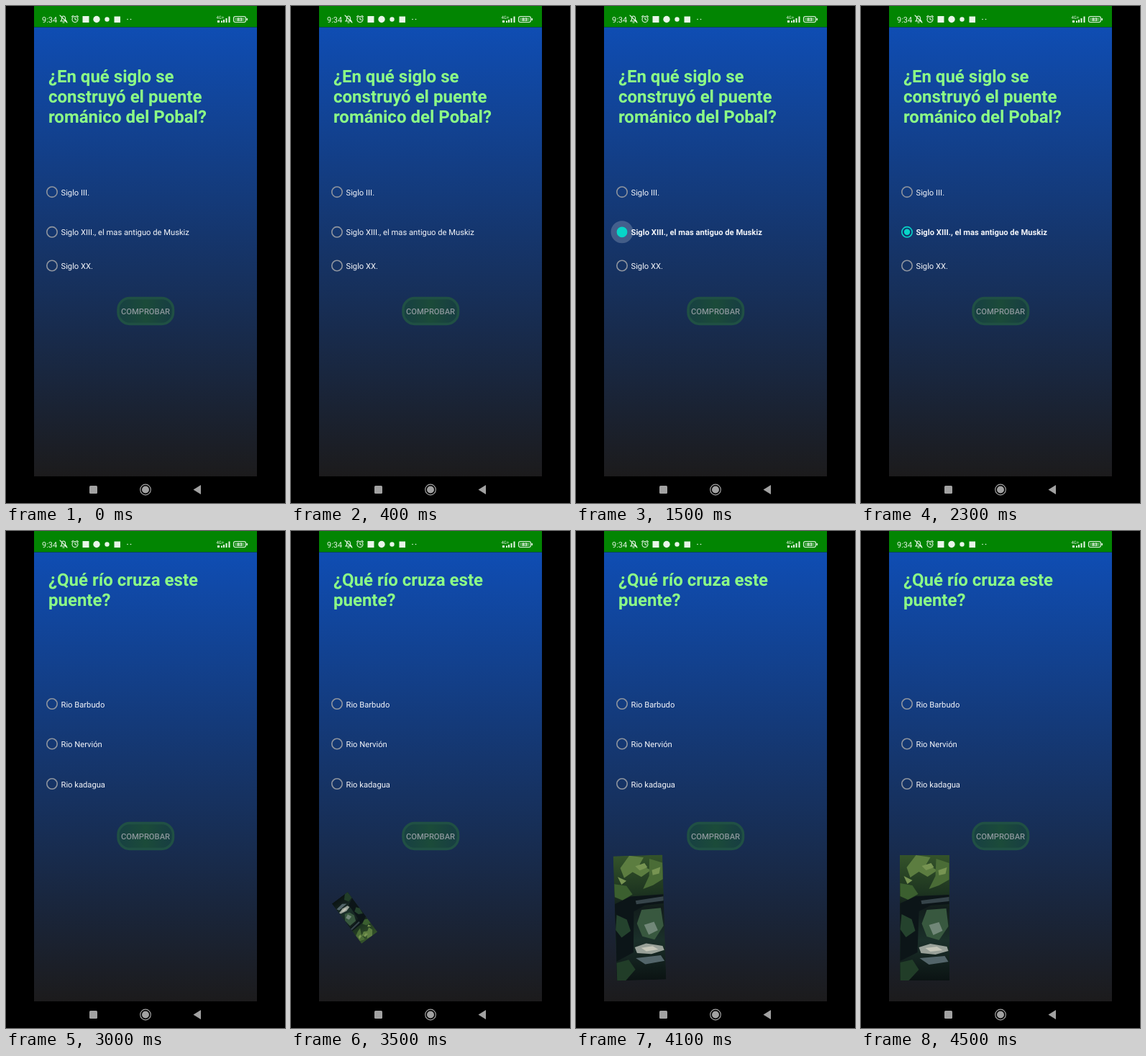
Write an HTML page that moves like this. It is 388x690 px and loops after 4600 ms.

```html
<!DOCTYPE html>
<html lang="es">
<head>
<meta charset="utf-8">
<title>Quiz</title>
<style>
  html, body { margin: 0; width: 100%; height: 100%; overflow: hidden; background: #000; }
  svg { display: block; width: 100vw; height: 100vh; font-family: Roboto, sans-serif; text-rendering: geometricPrecision; }
  .title { font-size: 24px; font-weight: 700; fill: #8dff86; }
  .option { font-size: 11.2px; fill: #f4f6fa; }
  .radio { fill: none; stroke: #8f959f; stroke-width: 1.6; }
  .button { font-size: 11.2px; font-weight: 500; fill: #8b969b; text-anchor: middle; }
  .line { fill: none; stroke: #e8f5e8; stroke-width: 1.1; stroke-linecap: round; }
</style>
</head>
<body>
<svg viewBox="0 0 388 690">
  <defs>
    <linearGradient id="sky" x2="0" y2="1">
      <stop stop-color="#0f4db3"/><stop offset="1" stop-color="#1c1b1c"/>
    </linearGradient>
    <linearGradient id="pill">
      <stop stop-color="#174043"/><stop offset=".5" stop-color="#1b4b39"/><stop offset="1" stop-color="#173d43"/>
    </linearGradient>
    <linearGradient id="forest" x2="0" y2="1">
      <stop stop-color="#34532a"/><stop offset=".3" stop-color="#1d3420"/>
      <stop offset=".42" stop-color="#121d1c"/><stop offset=".68" stop-color="#1b302a"/>
      <stop offset="1" stop-color="#0b1313"/>
    </linearGradient>
    <clipPath id="screen"><path d="M39 29H349V653H39Z"/></clipPath>
    <clipPath id="frame"><path d="M-34.5-87H34.5V87H-34.5Z"/></clipPath>
  </defs>

  <rect width="388" height="690"/>
  <rect x="39" width="310" height="29.5" fill="#028502"/>
  <rect x="39" y="29.5" width="310" height="623.5" fill="url(#sky)"/>

  <!-- status bar -->
  <g fill="#e8f5e8">
    <text x="50" y="22.5" font-size="11">9:34</text>
    <path class="line" d="M76 21H84L82.500 19V16.500Q82 14 80 14T77.500 16.500V19ZM79 23H81M75 13L85 23"/>
    <circle class="line" cx="96" cy="18.500" r="4"/>
    <path class="line" d="M96 16V18.500L98 19.500M91.500 15L93.500 13.300M100.500 15L98.500 13.300"/>
    <rect x="106.500" y="14" width="9" height="9"/>
    <circle cx="126" cy="18.500" r="4.700"/>
    <circle cx="140.500" cy="18.500" r="3.200"/>
    <rect x="150.500" y="14.500" width="8.500" height="8.500"/>
    <circle cx="169" cy="18.500" r=".8"/><circle cx="173.500" cy="18.500" r=".8"/>
    <text x="292.500" y="17.500" font-size="6">4G+</text>
    <path d="M294 20H297V23H294ZM299 20.500H301V23H299ZM302 19H304V23H302ZM305.500 17H307.500V23H305.500ZM309.500 14.500H311.500V23H309.500Z"/>
    <rect class="line" x="316.500" y="14.500" width="17" height="8" rx="2.500"/>
    <rect x="318" y="16" width="14" height="5" rx="1" opacity=".3"/>
    <rect x="334.500" y="17" width="1.500" height="3"/>
    <text x="325" y="21" font-size="6.500" font-weight="700" text-anchor="middle">83</text>
  </g>

  <g id="first"></g>
  <g id="second"></g>

  <rect x="156" y="405.500" width="76.500" height="36" rx="16" fill="url(#pill)" stroke="#205044" stroke-width="3.500"/>
  <text class="button" x="194" y="427.500">COMPROBAR</text>

  <g clip-path="url(#screen)">
    <g id="photo"><g clip-path="url(#frame)">
      <rect x="-34.500" y="-87" width="69" height="174" fill="url(#forest)"/>
      <path fill="#5c7d40" d="M-12-87L8-84 2-74 18-66 4-57-8-64-20-56-25-70Z"/>
      <path fill="#4a6c36" d="M16-82L34-76V-53L20-45 6-40 15-58Z"/>
      <path fill="#779452" d="M-4-72L9-76 13-70 2-66ZM19-66L31-70 29-61 20-59ZM-29-58L-17-52-24-47Z"/>
      <path fill="#3b5f2f" d="M-34-48L-17-45-9-33-23-25-34-30Z"/>
      <path fill="#0c1518" d="M-34-20L-12-30 34-32V-19L8-17-8-9-10 48-34 60Z"/>
      <path fill="#36444a" d="M-5-24L34-29V-23L-4-19Z"/>
      <path fill="#38583f" d="M3-11L30-13 33 12 20 31 3 26-4 8Z"/>
      <path fill="#24422d" d="M-32-5L-18 2-13 18-26 27-34 16Z"/>
      <path fill="#718778" d="M6 10L20 6 25 18 12 24Z"/>
      <path fill="#99a199" d="M-8 41L8 36 31 40 33 46 15 51-5 49Z"/>
      <path fill="#c5c6b9" d="M1 42L17 40 25 45 8 47Z"/>
      <path fill="#53656a" d="M-7 56L28 53 33 61 6 65Z"/>
      <path fill="#213d28" d="M-34 62L-17 58-8 72-22 87H-34Z"/>
    </g></g>
  </g>

  <!-- navigation bar -->
  <g fill="#a2a2a2">
    <rect x="116" y="666" width="11" height="11" rx="1.500"/>
    <circle cx="194" cy="671.500" r="5"/>
    <circle cx="194" cy="671.500" r="7.300" fill="none" stroke="#a2a2a2" stroke-width="1.200"/>
    <path d="M260.500 671.500L271 665V678Z"/>
  </g>
</svg>
<script>
const LOOP = 4600, STEP = 100;
const PAGE_CHANGE = 2900, TOUCH = 1300, CHECKED = 1350;
const SPIN_START = 3000, SPIN_TIME = 1150;
const TEAL = '#08d5c8';
const byId = id => document.getElementById(id);
const clamp = x => Math.min(1, Math.max(0, x));

function setAttributes(node, values) {
  for (const [key, value] of Object.entries(values)) node.setAttribute(key, value);
}

function buildPage(id, titleY, title, options) {
  const lines = title.map((line, i) => `<text class="title" x="59" y="${titleY + i * 28}">${line}</text>`);
  const rows = options.map(([y, label]) => `<g>
    <circle class="ripple" cx="64" cy="${y}" fill="#fff" opacity="0"/>
    <circle class="radio" cx="64" cy="${y}" r="7.2"/>
    <circle class="dot" cx="64" cy="${y}" r="0" fill="${TEAL}"/>
    <text class="option" x="76.5" y="${y + 4.6}">${label}</text></g>`);
  byId(id).innerHTML = lines.join('') + rows.join('');
}

buildPage('first', 106, ['¿En qué siglo se', 'construyó el puente', 'románico del Pobal?'],
  [[258.2, 'Siglo III.'], [313.8, 'Siglo XIII., el mas antiguo de Muskiz'], [360.5, 'Siglo XX.']]);
buildPage('second', 75.5, ['¿Qué río cruza este', 'puente?'],
  [[240, 'Rio Barbudo'], [295.5, 'Rio Nervión'], [351, 'Rio kadagua']]);

const answer = byId('first').querySelectorAll('g')[1];
const [ripple, ring, dot, label] = answer.children;

function drawAnswer(t) {
  const checked = t >= CHECKED;
  const fill = clamp((t - CHECKED) / 150);
  const settle = clamp((t - CHECKED - 150) / 200);
  const outer = 8 - 0.6 * fill * (1 - settle);
  const inner = checked ? 6.4 * (1 - fill) + 6.4 * settle : 6.4;

  ring.style.stroke = checked ? TEAL : '';
  ring.style.strokeWidth = outer - inner;
  ring.setAttribute('r', (outer + inner) / 2);
  dot.setAttribute('r', fill === 1 ? 6 - 1.8 * settle : 0);
  label.style.fontWeight = checked ? 700 : 400;

  const spread = clamp((t - TOUCH) / 200);
  const fade = 1 - clamp((t - 1500) / 350);
  setAttributes(ripple, { r: 8 + 7.5 * spread, opacity: t < TOUCH ? 0 : 0.2 * fade });
}

function drawPhoto(t) {
  const progress = clamp((t - SPIN_START) / SPIN_TIME);
  const scale = (1 - Math.cos(Math.PI * progress)) / 2;
  setAttributes(byId('photo'), {
    transform: `translate(88.5 537) rotate(${360 * scale}) scale(${scale})`,
    visibility: scale ? 'visible' : 'hidden'
  });
}

function draw(now) {
  const t = Math.floor((now % LOOP) / STEP) * STEP;
  const firstPage = t < PAGE_CHANGE;
  byId('first').style.display = firstPage ? '' : 'none';
  byId('second').style.display = firstPage ? 'none' : '';
  drawAnswer(t);
  drawPhoto(t);
}

const start = performance.now();
function tick() {
  draw(performance.now() - start);
  requestAnimationFrame(tick);
}
tick();
</script>
</body>
</html>
```
